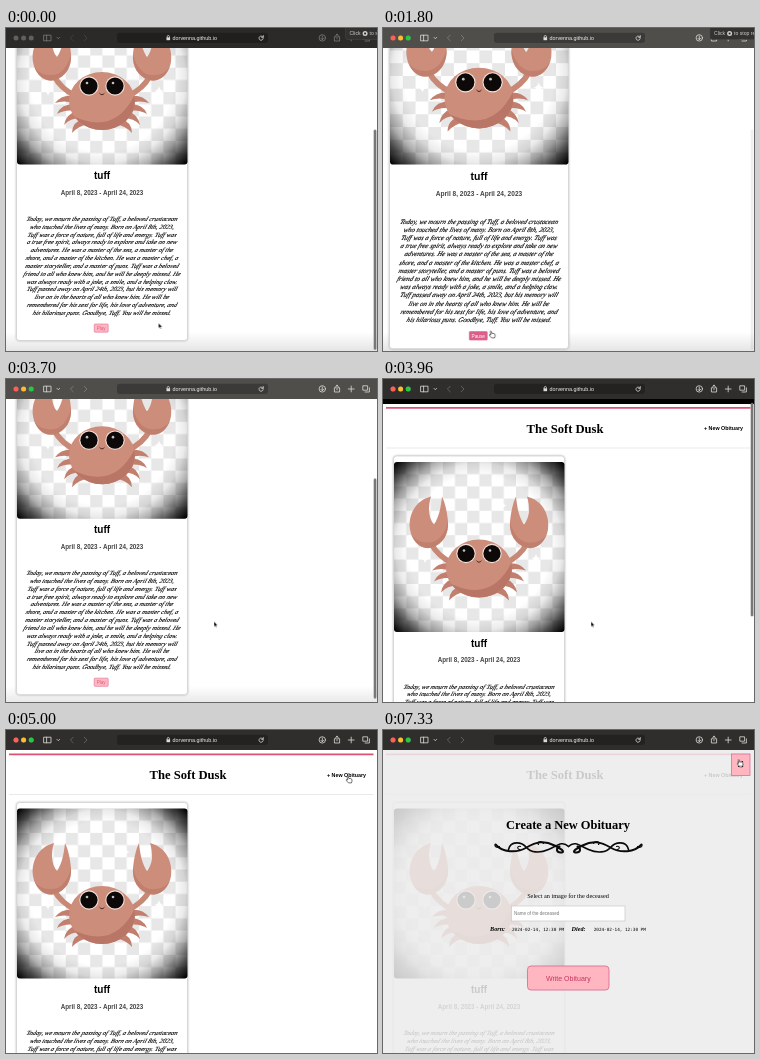
These frames come from a looping animation (371x323 px, 7.36 s). An HTML page:

```html
<!DOCTYPE html>
<html lang="en">
<head>
<meta charset="utf-8">
<title>Obituary page</title>
<style>
  html, body { margin: 0; width: 100%; height: 100%; overflow: hidden; background: #000; }
  svg { display: block; }
  text { font-family: "Liberation Sans", Arial, sans-serif; }
  .serif { font-family: "Liberation Serif", Times, serif; }
  .mono { font-family: "DejaVu Sans Mono", monospace; font-size: 4.33px; }
  .mid { text-anchor: middle; }
  .bold { font-weight: bold; }
  .line { fill: none; stroke-linecap: round; stroke-linejoin: round; }
  .script { font: italic 6.45px "Liberation Serif", Times, serif; stroke: #000; stroke-width: .12; }

  .anim { animation: 7360ms linear infinite; }
  .hard { animation-timing-function: step-end; }

  #page { animation-name: scroll; }
  @keyframes scroll {
    0%, 49.7% { transform: translateY(-112px); }
    50.27% { transform: translateY(-109.5px); }
    51.4% { transform: translateY(-60px); }
    53% { transform: translateY(0); animation-timing-function: ease-out; }
    53.6%, 54% { transform: translateY(4.5px); animation-timing-function: ease-out; }
    57%, 100% { transform: translateY(0); }
  }

  #thumb { animation-name: thumb; }
  @keyframes thumb {
    0%, 7% { transform: translateY(81.7px); opacity: 1; }
    12%, 24.5% { transform: translateY(81.7px); opacity: .12; }
    27%, 49.5% { transform: translateY(81.7px); opacity: 0; }
    50.27% { transform: translateY(80px); opacity: 1; }
    53% { transform: translateY(0); }
    53.7% { transform: translateY(4px) scaleY(.97); }
    57%, 63% { transform: translateY(0); opacity: 1; }
    66%, 100% { transform: translateY(0); opacity: 0; }
  }

  #card { transform-origin: 96px 248px; animation-name: grow; }
  @keyframes grow {
    0%, 2.5% { transform: scale(1); animation-timing-function: ease; }
    6% { transform: scale(1.047); }
    26.5% { transform: scale(1.047); animation-timing-function: ease; }
    30%, 100% { transform: scale(1); }
  }

  #bar { animation-name: tint; }
  @keyframes tint {
    0%, 2% { fill: #2b2a28; }
    3.5%, 52.4% { fill: #504e4b; }
    53.6%, 100% { fill: #302e2c; }
  }
  #lights { animation-name: wake; }
  #icons { animation-name: dim; }
  @keyframes wake { 0% { opacity: 0; } 2.2%, 100% { opacity: 1; } }
  @keyframes dim { 0% { opacity: .45; } 2.2%, 100% { opacity: 1; } }

  #notice { animation-name: notice; }
  @keyframes notice {
    0%, .8% { transform: translateX(339.5px); animation-timing-function: ease-out; }
    5%, 26% { transform: translateX(327px); opacity: 1; }
    30%, 100% { transform: translateX(327px); opacity: 0; }
  }

  #play { animation-name: play; }
  #pause { animation-name: pause; }
  @keyframes play { 0%, 27% { visibility: visible; } 14% { visibility: hidden; } }
  @keyframes pause { 0%, 27% { visibility: hidden; } 14% { visibility: visible; } }
  .btn rect { fill: #ffb6c1; animation-name: fillHover; }
  .btn text { fill: #e0587c; animation-name: textHover; }
  @keyframes fillHover { 0%, 25.2% { fill: #ffb6c1; } 9.4% { fill: #db5f88; } }
  @keyframes textHover { 0%, 25.2% { fill: #e0587c; } 9.4% { fill: #fff; } }

  #form { animation-name: show; }
  @keyframes show { 0%, 70% { opacity: 0; } 71%, 100% { opacity: 1; } }
  #closeBox { animation-name: hover; }
  @keyframes hover { 0% { visibility: hidden; } 93% { visibility: visible; } }

  #pointer { animation-name: move; }
  @keyframes move {
    0%, 4.5% { transform: translate(152.5px, 295px); animation-timing-function: ease-in-out; }
    10.5% { transform: translate(98px, 302px); }
    22.5% { transform: translate(98px, 302px); animation-timing-function: ease-in; }
    24.46% { transform: translate(107px, 303px); }
    30% { transform: translate(186px, 288px); }
    36.5% { transform: translate(243px, 262px); animation-timing-function: ease-out; }
    42%, 54.6% { transform: translate(208px, 242.5px); animation-timing-function: ease-in; }
    57.88% { transform: translate(302px, 131px); animation-timing-function: ease-out; }
    63%, 72% { transform: translate(341px, 46px); animation-timing-function: ease-in-out; }
    79%, 85% { transform: translate(328px, 72px); animation-timing-function: ease-in-out; }
    94.5%, 100% { transform: translate(355px, 29.5px); }
  }
  #arrow { animation-name: arrow; }
  #hand { animation-name: hand; }
  @keyframes arrow {
    0%, 25.2%, 71.5% { visibility: visible; }
    9.4%, 62%, 93% { visibility: hidden; }
  }
  @keyframes hand {
    0%, 25.2%, 71.5% { visibility: hidden; }
    9.4%, 62%, 93% { visibility: visible; }
  }
</style>
</head>
<body>
<svg width="371" height="323" viewBox="0 0 371 323">
  <defs>
    <pattern id="checks" x="11" y="78.5" width="24.4" height="24.4" patternUnits="userSpaceOnUse">
      <path fill="#fff" d="M0 0h24.4v24.4H0z"/>
      <path fill="#e7e7e7" d="M0 0h12.2v12.2H0zM12.2 12.2h12.2v12.2H12.2z"/>
    </pattern>
    <radialGradient id="vignette" gradientUnits="userSpaceOnUse" cx="96" cy="163.5" r="119">
      <stop offset=".6" stop-opacity="0"/>
      <stop offset=".7" stop-opacity=".08"/>
      <stop offset=".8" stop-opacity=".32"/>
      <stop offset=".9" stop-opacity=".7"/>
      <stop offset="1" stop-opacity="1"/>
    </radialGradient>
    <linearGradient id="foot" x2="0" y2="1">
      <stop stop-color="#fff"/>
      <stop offset="1" stop-color="#dedede"/>
    </linearGradient>
    <clipPath id="shell"><ellipse cx="96" cy="185" rx="33" ry="29"/></clipPath>

    <g id="limbs">
      <path class="line" stroke="#c88876" stroke-width="5.5" d="M48 160Q55 173 70 180"/>
      <path fill="#c37f6e" d="M68 180Q56 178 49 187Q58 184 68 187ZM68 188Q55 188 51 198Q59 193 70 195ZM71 195Q60 198 58 209Q64 202 75 202ZM78 202Q66 206 66 217Q72 210 83 208Z"/>
      <path fill="#cd8d7b" d="M48 113C32 117 25 132 27 146C29 159 39 167 49 164C60 161 66 150 65 138C64 128 62 119 59 113C58 123 56 134 51 141C45 134 45 123 48 113Z"/>
      <path fill="#b97565" opacity=".55" d="M28 150C32 161 40 166 49 164C60 161 66 150 65 138C62 152 53 160 44 159C37 159 31 156 28 150Z"/>
    </g>
    <g id="eye">
      <circle r="9.7" fill="#f3e2d8"/>
      <circle r="8.6" fill="#0c0908"/>
      <circle cx="-2" cy="-3" r="1.3" fill="#fff" opacity=".75"/>
    </g>
    <path id="spark" fill="#fff" d="M0-5Q.7-.7 5 0Q.7.7 0 5Q-.7.7-5 0Q-.7-.7 0-5Z"/>
    <g id="curl" class="line" stroke="#0a0a0a">
      <path stroke-width="2" d="M-73-3C-66 5-52 6-42 0S-24-7-14-2S-4 5-8 5S-13 1-9-1"/>
      <path stroke-width="1.6" d="M-60 2C-58-7-47-6-42 0C-38 5-29 6-20 2S-6-7 0-1"/>
      <path stroke-width="1.1" d="M-73-3C-75-1-71 1-69-1M-49 2C-52 1-51-2-48-1M-30-3C-33-6-27-7-25-4"/>
    </g>
  </defs>

  <path d="M0 0H371V323H0z"/>

  <g id="page" class="anim">
    <path fill="#fff" d="M0 20H371V440H0z"/>
    <rect y="416" width="371" height="24" fill="url(#foot)"/>
    <path fill="#dc5274" d="M3 23.4H367.5V25.2H3z"/>
    <path fill="#e9e9e9" d="M3 64H367.5V65H3z"/>
    <text class="serif bold mid" x="182" y="49" font-size="12.6">The Soft Dusk</text>
    <text class="bold" x="321" y="46.6" font-size="5.35">+ New Obituary</text>

    <g id="card" class="anim">
      <rect x="10.5" y="72.5" width="171" height="352" rx="3" fill="#fff" stroke="#d2d2d2" stroke-width=".8" style="filter:drop-shadow(0 .5px 1.2px #0004)"/>
      <rect x="11" y="78.5" width="170.5" height="170" rx="3" fill="url(#checks)"/>
      <rect x="11" y="78.5" width="170.5" height="170" rx="3" fill="url(#vignette)"/>
      <use href="#spark" x="119" y="122"/>
      <use href="#spark" x="42" y="175"/>
      <use href="#spark" x="153" y="175"/>
      <use href="#limbs"/>
      <use href="#limbs" transform="matrix(-1 0 0 1 192 0)"/>
      <ellipse cx="96" cy="185" rx="33" ry="29" fill="#cd8d7b"/>
      <path clip-path="url(#shell)" fill="#b97565" d="M63 198Q108 222 129 178V218H63z"/>
      <use href="#eye" x="83" y="170"/>
      <use href="#eye" x="109" y="170"/>
      <path class="line" stroke="#3a1f1a" stroke-width=".9" d="M93.8 177.5Q96 180.3 98.2 177.5"/>

      <text class="bold mid" x="96" y="263" font-size="10">tuff</text>
      <text class="bold mid" x="96" y="278.7" font-size="6.27" fill="#444">April 8, 2023 - April 24, 2023</text>
      <g id="eulogy"></g>

      <g id="play" class="btn anim hard">
        <rect class="anim hard" x="88.2" y="408" width="14" height="8.2" rx=".8" stroke="#db7093" stroke-width=".6"/>
        <text class="mid anim hard" x="95.2" y="413.8" font-size="4.5">Play</text>
      </g>
      <g id="pause" class="btn anim hard">
        <rect class="anim hard" x="86.7" y="408" width="17.2" height="8.2" rx=".8" stroke="#db7093" stroke-width=".6"/>
        <text class="mid anim hard" x="95.3" y="413.8" font-size="4.5">Pause</text>
      </g>
    </g>
  </g>

  <g transform="translate(0 20)">
    <rect id="thumb" class="anim" x="367.7" y="0" width="2.7" height="220" rx="1.3" fill="#777"/>
  </g>

  <g id="form" class="anim">
    <path fill="#ececec" fill-opacity=".86" d="M0 20H371V323H0z"/>
    <text class="serif bold mid" x="185" y="99" font-size="12.45">Create a New Obituary</text>
    <use href="#curl" x="185.5" y="117.5"/>
    <use href="#curl" transform="matrix(-1 0 0 1 185.5 117.5)"/>
    <text class="serif mid" x="185" y="168.2" font-size="6.25">Select an image for the deceased</text>
    <rect x="128.5" y="176" width="113.5" height="15" fill="#fff" stroke="#c9c9c9" stroke-width=".7"/>
    <text x="131" y="185.2" font-size="4.5" fill="#777">Name of the deceased</text>
    <g class="bold" font-size="6.2" font-style="italic">
      <text class="serif" x="107" y="200.7">Born:</text>
      <text class="serif" x="188.5" y="200.7">Died:</text>
    </g>
    <text class="mono" x="129" y="200.7">2024-02-14, 12:30 PM</text>
    <text class="mono" x="210.7" y="200.7">2024-02-14, 12:30 PM</text>
    <rect x="144.5" y="236" width="81.5" height="24" rx="3.5" fill="#ffb6c1" stroke="#db7093" stroke-width=".9"/>
    <text class="mid" x="185.3" y="250.6" font-size="7.04" fill="#c9365f">Write Obituary</text>
    <rect id="closeBox" class="anim hard" x="348.5" y="24" width="18.5" height="21.5" fill="#ffb6c1" stroke="#db7093" stroke-width=".8"/>
    <text class="bold mid" x="357.7" y="37.4" font-size="8.6">X</text>
  </g>

  <rect id="bar" class="anim" width="371" height="20"/>
  <rect x="111" y="4.8" width="151" height="10.2" rx="2.4" fill="#000" fill-opacity=".26"/>
  <g fill="#62605e">
    <circle cx="10" cy="10" r="2.5"/><circle cx="17.6" cy="10" r="2.5"/><circle cx="25.2" cy="10" r="2.5"/>
  </g>
  <g id="lights" class="anim hard">
    <circle cx="10" cy="10" r="2.5" fill="#fe5f57"/>
    <circle cx="17.6" cy="10" r="2.5" fill="#febc2e"/>
    <circle cx="25.2" cy="10" r="2.5" fill="#28c840"/>
  </g>
  <g id="icons" class="anim hard">
    <g class="line" stroke="#dedcda" stroke-width=".8">
      <path d="M38 7.2H45V12.8H38zM40.6 7.2V12.8M51 9.4L52.3 10.7L53.6 9.4"/>
      <path opacity=".35" d="M67.2 7.2L64.4 10L67.2 12.8M78.2 7.2L81 10L78.2 12.8"/>
      <circle cx="316.3" cy="9.9" r="3.2"/>
      <path d="M316.3 8V11.6M315 10.4L316.3 11.7L317.6 10.4"/>
      <path d="M329.6 8.7H328.4V13H333.6V8.7H332.4M331 10.8V6.2M329.7 7.4L331 6.1L332.3 7.4"/>
      <path d="M345.2 7.1V12.9M342.3 10H348.1"/>
      <path d="M357.2 6.8H361.6V11.2H357.2zM359 13H363.4V8.8"/>
    </g>
  </g>
  <g class="line" stroke="#dedcda" stroke-width=".8">
    <path d="M257 9.2A2.1 2.1 0 1 0 257.2 10.6M257.3 7.6V9.3H255.6"/>
    <path d="M161.2 9.6V8.6A1.1 1.1 0 0 1 163.4 8.6V9.6"/>
  </g>
  <path fill="#dedcda" d="M160.5 9.4H164.1V12.2H160.5z"/>
  <text x="166.6" y="11.9" font-size="5.4" fill="#f1efed">dorvenna.github.io</text>

  <g id="notice" class="anim">
    <path fill="#333231" stroke="#4a4947" stroke-width=".5" d="M0-1H50V11.5H2Q0 11.5 0 9.5z"/>
    <g fill="#cfcdcb" font-size="5.1">
      <text x="4" y="7.4">Click</text>
      <circle cx="19.6" cy="5.5" r="2.5"/>
      <rect x="18.7" y="4.6" width="1.8" height="1.8" fill="#252423"/>
      <text x="24" y="7.4">to stop recording</text>
    </g>
  </g>

  <g id="pointer" class="anim">
    <path id="arrow" class="anim hard" stroke="#fff" stroke-width=".5" d="M0 0V5.3L1.2 4.2L2 6.1L2.9 5.7L2.1 3.9H3.8z"/>
    <path id="hand" class="anim hard" fill="#fff" stroke="#111" stroke-width=".6" stroke-linejoin="round"
      d="M0 .6Q.7-.4 1.4.6L1.8 2.5Q4.2 2 4.9 3.4Q5.4 5.2 4.4 6.9H1.5Q.2 5.6-1 4Q-.8 3 .7 3.9z"/>
  </g>
</svg>
<script>
  const eulogy = [
    "Today, we mourn the passing of Tuff, a beloved crustacean",
    "who touched the lives of many. Born on April 8th, 2023,",
    "Tuff was a force of nature, full of life and energy. Tuff was",
    "a true free spirit, always ready to explore and take on new",
    "adventures. He was a master of the sea, a master of the",
    "shore, and a master of the kitchen. He was a master chef, a",
    "master storyteller, and a master of puns. Tuff was a beloved",
    "friend to all who knew him, and he will be deeply missed. He",
    "was always ready with a joke, a smile, and a helping claw.",
    "Tuff passed away on April 24th, 2023, but his memory will",
    "live on in the hearts of all who knew him. He will be",
    "remembered for his zest for life, his love of adventure, and",
    "his hilarious puns. Goodbye, Tuff. You will be missed."
  ];
  // Each line is slanted about its own baseline for a handwritten look.
  document.getElementById("eulogy").innerHTML = eulogy.map((line, i) =>
    `<text class="script mid" transform="translate(95.5 ${305 + i * 7.83}) skewX(-20)">${line}</text>`
  ).join("");
</script>
</body>
</html>
```
